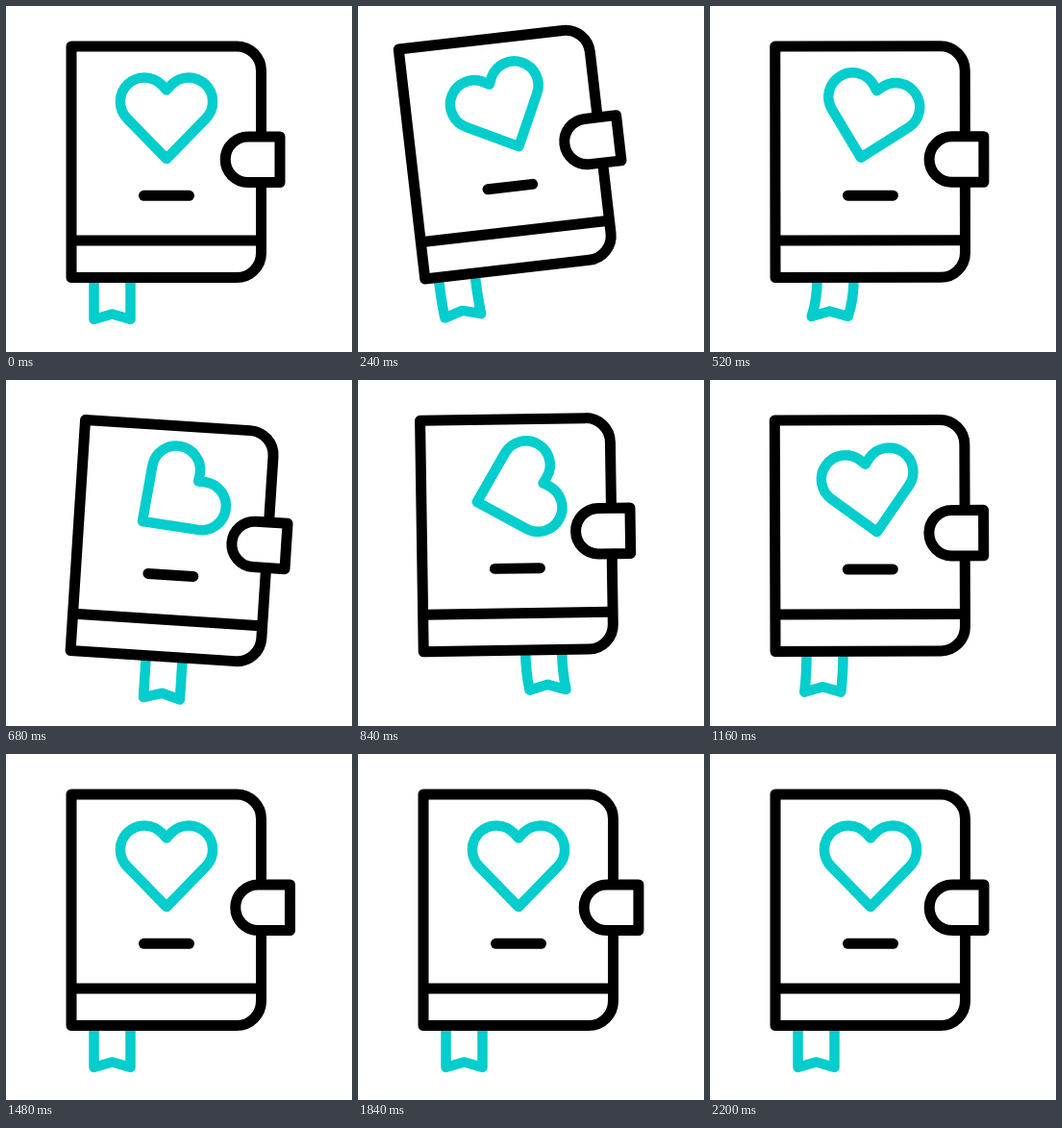
These frames come from a looping animation (360 by 360 pixels, 2760 ms). An HTML page:

```html
<!DOCTYPE html>
<html lang="en">
<head>
<meta charset="utf-8">
<title>Diary</title>
<style>
  html, body { margin: 0; width: 100%; height: 100%; overflow: hidden; background: #fff; }
  svg { display: block; width: 100%; height: 100%; }
  path { fill: none; stroke: #000; stroke-width: 11; stroke-linecap: round; stroke-linejoin: round; }
  .solid { fill: #fff; }
  .teal { stroke: #03cdcd; stroke-width: 10.5; }
</style>
</head>
<body>
<svg viewBox="0 0 360 360">
  <g id="book">
    <path id="ribbon" class="teal"/>
    <path class="solid" d="M68 42H240A25.5 25.5 0 0 1 265.5 67.5V257A25.5 25.5 0 0 1 240 282.5H68Z"/>
    <path d="M70 244H263"/>
    <path d="M143.5 197.3H190.5"/>
    <path id="heart" class="teal" d="M167 159L126 117A25 25 0 0 1 162 82L167 87.5L172 82A25 25 0 0 1 208 117Z"/>
    <path id="clasp" class="solid" d="M285 136H252A23.75 23.75 0 0 0 252 183.5H285Z"/>
  </g>
</svg>
<script>
const LOOP = 2760, STEP = 40;
const $ = id => document.getElementById(id);
const ease = s => s * s * (3 - 2 * s);
const clamp = s => Math.max(0, Math.min(1, s));

// Eases from rest at `begin` through each turning point [time, value]
function swing(t, begin, ...turns) {
  let from = begin, value = 0;
  for (const [time, goal] of turns) {
    value += (goal - value) * ease(clamp((t - from) / (time - from)));
    from = time;
  }
  return value;
}

// The ribbon tip flutters with a decaying wave
function flutter(t) {
  if (t > 1320) return 0;
  const s = t - 520;
  return -6 * Math.cos(2 * Math.PI * s / 640) * Math.exp(-s / 700) * clamp(t / 520) ** 2;
}

function ribbonPath(x, bend) {
  const left = 91.5 + x, right = 129.5 + x, foot = 326 - Math.abs(bend) / 2;
  return `M${left} 282Q${left} 306 ${left + bend} ${foot}` +
    `L${(left + right) / 2 + bend} ${foot - 5.5}L${right + bend} ${foot}Q${right} 306 ${right} 282`;
}

function draw(now) {
  const t = Math.floor((now % LOOP) / STEP) * STEP;
  const tilt = swing(t, 0, [270, -6.8], [690, 3.7], [900, -2], [1220, 0]);
  const spin = swing(t, 0, [280, -20], [885, 76.5], [1180, -10.7], [1480, 0]);
  const slide = swing(t, 0, [280, -10], [930, 87.5], [1217, 0]);
  const pull = swing(t, 1160, [1560, 11.7], [2200, 0]);

  $('book').setAttribute('transform', `rotate(${tilt} 82 268)`);
  $('heart').setAttribute('transform', `rotate(${spin} 167 116.5)`);
  $('clasp').setAttribute('transform', `translate(${pull} 0)`);
  $('ribbon').setAttribute('d', ribbonPath(slide, flutter(t)));
}

const start = performance.now();
function frame() {
  draw(performance.now() - start);
  requestAnimationFrame(frame);
}
frame();
</script>
</body>
</html>
```
